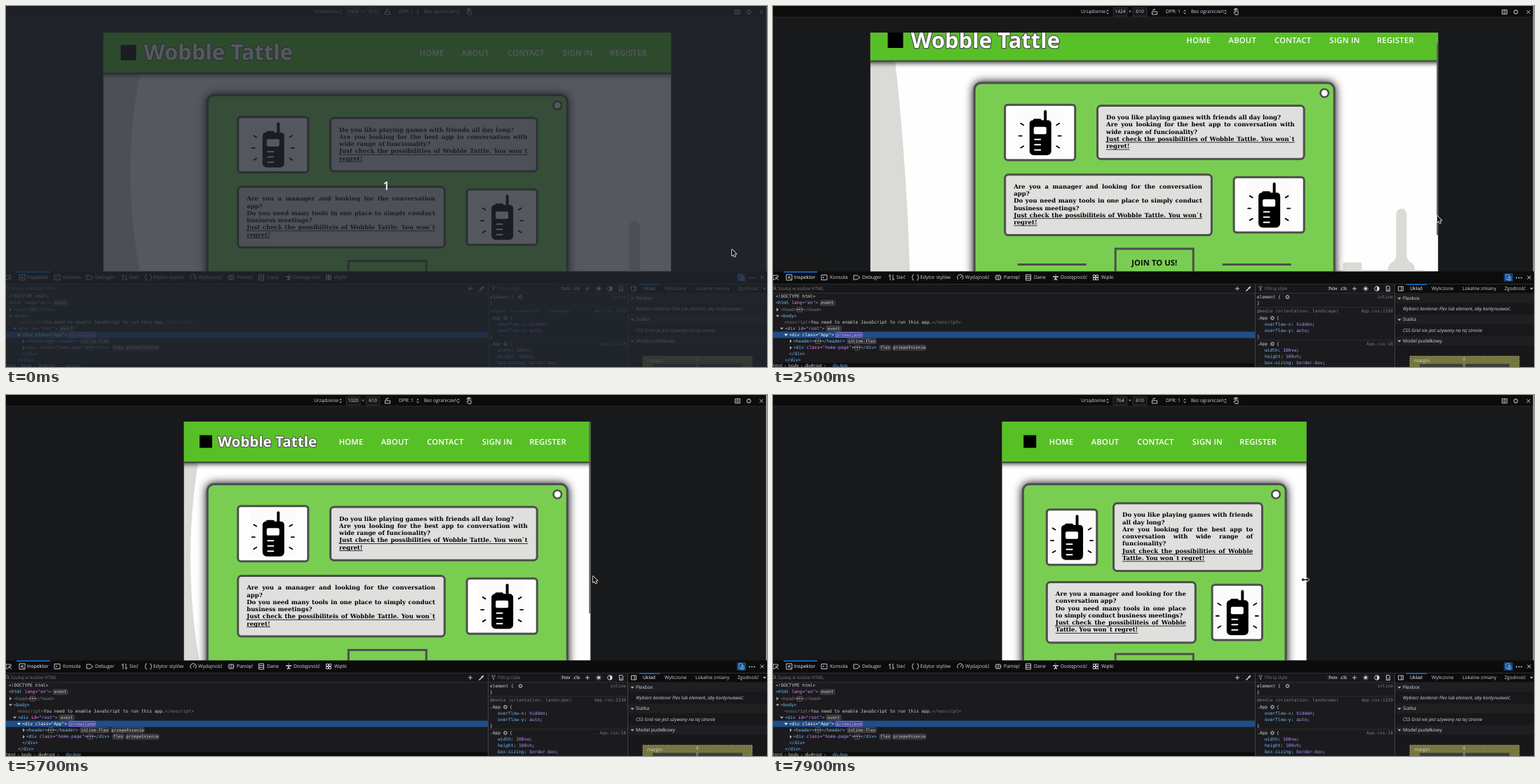
Animation of 1085x516 px, one loop 8000 ms. Source, as an HTML page with a canvas:

```html
<!DOCTYPE html>
<html lang="pl">
<head>
<meta charset="utf-8">
<style>
html, body { margin: 0; width: 100%; height: 100%; overflow: hidden; background: #18191a; }
canvas { display: block; }
</style>
</head>
<body>
<canvas id="stage" width="1085" height="516"></canvas>
<script>
const ctx = document.getElementById('stage').getContext('2d');
const LOOP = 8000, STEP = 100, SCALE = 0.5688, TOP = 38, BOTTOM = 379.5, MID = 543.75;
const UI = '"Open Sans", "Noto Sans", sans-serif';
const MONO = '6.25px "DejaVu Sans Mono", monospace';
const SERIF = 'bold 8.53px "DejaVu Serif", serif';
const DARK = '#4d4f4c', GREY = '#dadad6';
const BLUE = '#75bfff', PINK = '#ff7de9', VIOLET = '#b98eff', DIM = '#7c7c80', PALE = '#d7d7db';

// Keyframe rows are [time, value, value, ...].
const WIDTHS = [[3000, 1424], [3900, 1250], [4000, 1230], [4100, 1230], [4200, 1167], [4300, 1167],
  [5200, 1020], [6100, 1020], [7000, 903], [7200, 862], [7600, 794], [7700, 794], [7900, 764]];
const SCROLL = [[300, 0], [900, 82], [1000, 82], [1700, 17.5], [5250, 17.5], [5600, 0]];
const POINTER = [[0, 1035, 348], [350, 948, 300], [900, 948, 364], [1000, 948, 364], [1700, 947, 300],
  [2500, 947, 300], [2900, 948, 295], [5200, 832, 262], [5700, 837, 259], [6100, 834, 260]];
const GRIP_Y = [[3000, 296], [3900, 294], [5200, 262], [7200, 261], [7900, 264]];
const WAVE = [[0, 52, 39, 62], [1000, 22, 55, 46], [2500, 36, 50, 57], [3900, 60, 44, 72],
  [5700, 20, 10, 30], [6200, 14, 6, 24], [7000, -12, -18, -6]];

function at(t, keys) {
  if (t <= keys[0][0]) return keys[0].slice(1);
  const next = keys.findIndex(k => k[0] > t);
  if (next < 0) return keys[keys.length - 1].slice(1);
  const a = keys[next - 1], b = keys[next], p = (t - a[0]) / (b[0] - a[0]);
  return a.slice(1).map((v, i) => v + (b[i + 1] - v) * p);
}

function rect(x, y, w, h, color) {
  ctx.fillStyle = color;
  ctx.fillRect(x, y, w, h);
}

function round(x, y, w, h, r, fill, stroke, line = 1) {
  ctx.beginPath();
  ctx.roundRect(x, y, w, h, r);
  if (fill) { ctx.fillStyle = fill; ctx.fill(); }
  if (stroke) { ctx.strokeStyle = stroke; ctx.lineWidth = line; ctx.stroke(); }
}

function disc(x, y, r, fill, stroke, line) {
  round(x - r, y - r, 2 * r, 2 * r, r, fill, stroke, line);
}

function text(s, x, y, color, font, align = 'left') {
  ctx.font = font;
  ctx.textAlign = align;
  ctx.fillStyle = color;
  ctx.fillText(s, x, y);
}

function icon(d, x, y, color = PALE, line = 0.9) {
  ctx.save();
  ctx.translate(x, y);
  ctx.strokeStyle = color;
  ctx.lineWidth = line;
  ctx.stroke(new Path2D(d));
  ctx.restore();
}

function label(s, x, y, color = PALE, size = 6.9, style = '') {
  text(s, x, y, color, `${style} ${size}px ${UI}`);
}

function code(x, y, ...parts) {
  for (let i = 0; i < parts.length; i += 2) {
    text(parts[i], x, y, parts[i + 1], MONO);
    x += ctx.measureText(parts[i]).width;
  }
}

function badge(s, x, y, w, color = PALE, fill = '#2e2e33', edge = '#66666b') {
  round(x, y - 3.5, w, 7, 1.5, fill, edge, 0.6);
  text(s, x + w / 2, y, color, '5.9px "DejaVu Sans Mono", monospace', 'center');
}

function arrow(x, y, open, color = '#b1b1b3') {
  ctx.fillStyle = color;
  ctx.fill(new Path2D(open ? `M${x - 2} ${y - 1.3}h5l-2.5 3z` : `M${x - 1} ${y - 2.5}v5l3 -2.5z`));
}

function gear(x, y, r = 2.4) {
  disc(x, y, r, null, PALE, 0.8);
  ctx.setLineDash([1, 1]);
  disc(x, y, r + 0.7, null, PALE, 0.9);
  ctx.setLineDash([]);
}

const CROSS = 'M-2.5 -2.5l5 5M2.5 -2.5l-5 5', PLUS = 'M-3 0h6M0 -3v6';
const FRAME = 'M-3.5 -3h7v6h-7z', UPDOWN = 'M-1.3 -1l1.3 -1.6l1.3 1.6M-1.3 1l1.3 1.6l1.3 -1.6';

function topBar(width) {
  rect(0, 0, 1085, 16, '#0c0c0d');
  rect(0, 15.5, 1085, 1, '#2a2a2d');
  label('Urządzenie', 439, 8.5, PALE, 6.7);
  for (const x of [477, 587, 645]) icon(UPDOWN, x, 8.5);
  for (const [x, n] of [[485, width], [513, 610]]) {
    round(x, 2.5, 20, 12, 1, '#18181a', '#38383d', 0.8);
    text(n, x + 10, 8.5, PALE, `6.7px ${UI}`, 'center');
  }
  text('×', 509, 8.5, PALE, `6.7px ${UI}`, 'center');
  icon('M-3.5 0h7v4h-7zM-2 -1v-2h3l-1 -1', 544, 8);
  label('DPR: 1', 560, 8.5, PALE, 6.9);
  label('Bez ograniczeń', 596, 8.5, PALE, 6.7);
  icon('M-1 4l-2 -3l1 -1l1 1v-5h1.4v3l3 1l-.6 4zM-3 -2a3 3 0 0 1 6 0', 660, 8.5);
  icon(FRAME + 'M-1.5 0a1.5 1.5 0 1 0 3 0a1.5 1.5 0 1 0 -3 0', 1043, 8.5);
  gear(1059, 8.5);
  icon(CROSS, 1077, 8.5);
  rect(1083.6, 0, 1.4, BOTTOM, '#a9aca9');
}

function tabs() {
  rect(0, 379.5, 1085, 18, '#0c0c0d');
  rect(0, 397, 1085, 0.8, '#38383d');
  rect(15, 379.5, 48, 1.4, '#0a84ff');
  const names = [['Inspektor', 30], ['Konsola', 81], ['Debuger', 127], ['Sieć', 176], ['Edytor stylów', 210],
    ['Wydajność', 274], ['Pamięć', 329], ['Dane', 372], ['Dostępność', 410], ['Wątki', 468]];
  names.forEach(([s, x], i) => label(s, x, 388.5, i ? PALE : '#ffffff'));
  icon('M-4 -3h7v3M-4 -3v6h3M0 0l4 4M0 0v3M0 0h3', 4, 388);
  icon('M-4 -4h8v8h-8zM-1 -1l4 4M-1 2v-3h3', 23, 388);
  icon('M-4 -3.5h8v7h-8zM-2 -1l1.5 1l-1.5 1', 73, 388);
  icon('M-4 -3h5l4 3l-4 3h-5z', 119, 388);
  icon('M-2 4v-8l-2 2.5M2 -4v8l2 -2.5', 169, 388);
  icon('M-2 -4q-2 0 -2 2q0 2 -1 2q1 0 1 2q0 2 2 2M2 -4q2 0 2 2q0 2 1 2q-1 0 -1 2q0 2 -2 2', 203, 388);
  icon('M-3 3a4.2 4.2 0 1 1 6 0M0 1l2 -3', 267, 388);
  icon('M-3 -3h6v6h-6zM-4.5 -1h1M-4.5 1h1M3 -1h1.5M3 1h1.5M0 -3v6', 321, 388);
  icon('M-3.5 -4h7v8h-7zM-3.5 -1.3h7M-3.5 1.3h7', 364, 388);
  icon('M-4 -1h8M0 -1v2l-2 3M0 1l2 3M-.5 -3.5h1', 403, 388, PALE, 1.3);
  icon('M-3.5 -3.5h3v3h-3zM.5 -3.5h3v3h-3zM-3.5 .5h3v3h-3zM.5 .5h3v3h-3z', 460, 388);
  round(1042, 382, 13, 12, 1, '#16406f');
  icon('M-3 -4h5v7h-5zM0 -1h4v5h-4z', 1048, 388, BLUE);
  for (const x of [1060, 1063.5, 1067]) disc(x, 388.5, 0.9, PALE);
  icon(CROSS, 1078, 388);
}

function markup(overflowing) {
  rect(0, 398, 688, 118, '#1b1b1e');
  rect(0, 398, 688, 12, '#18181a');
  rect(0, 410, 688, 0.7, '#38383d');
  label('Szukaj w kodzie HTML', 7, 404, DIM, 6.4);
  icon('M1 1l2 2M-2.5 0a2 2 0 1 0 4 0a2 2 0 1 0 -4 0', 2, 403, DIM);
  icon(PLUS, 662, 404);
  icon('M-3.5 3.5l4 -4M0 -2l2 2M1 -1l2 -2', 678, 404, PALE, 1.5);
  rect(0, 465.5, 688, 9, '#204e8a');
  code(4, 415.5, '<!DOCTYPE html>', PALE);
  code(4, 424.5, '<html ', BLUE, 'lang', PINK, '="en"', VIOLET, '>', BLUE);
  badge('event', 67, 424.5, 21);
  arrow(6, 434, false);
  code(11, 434, '<head>', DIM);
  badge('•••', 34, 434, 8);
  code(43, 434, '</head>', DIM);
  arrow(6, 443, true);
  code(11, 443, '<body>', BLUE);
  code(16, 452, '<noscript>', DIM, 'You need to enable JavaScript to run this app.', PALE, '</noscript>', DIM);
  arrow(12, 461, true);
  code(17, 461, '<div ', BLUE, 'id', PINK, '="root"', VIOLET, '>', BLUE);
  badge('event', 76, 461, 21);
  arrow(18, 470, true, '#ffffff');
  code(23, 470, '<div class="App">', '#ffffff');
  badge('przewijane', 89.5, 470, 38, '#c3a6ff', '#3f4f9c', VIOLET);
  arrow(25, 479, false);
  code(29, 479, '<header>', BLUE);
  badge('•••', 60, 479, 8);
  code(69, 479, '</header>', BLUE);
  badge('inline-flex', 106, 479, 41);
  if (overflowing) badge('przepełnienie', 150, 479, 47);
  arrow(25, 488.5, false);
  code(29, 488.5, '<div ', BLUE, 'class', PINK, '="home-page"', VIOLET, '>', BLUE);
  badge('•••', 116, 488.5, 8);
  code(125, 488.5, '</div>', BLUE);
  badge('flex', 152, 488.5, 16);
  badge('przepełnienie', 171, 488.5, 47);
  code(23, 497.5, '</div>', BLUE);
  code(17, 506.5, '</div>', BLUE);
  rect(0, 510.5, 688, 6, '#0c0c0d');
  label('html  ›  body  ›  div#root  ›', 0, 514.5, PALE, 6.3);
  label('div.App', 85, 514.5, BLUE, 6.3);
}

function declaration(y, name, value) {
  code(701, y, name, BLUE, ': ', PALE, value, VIOLET, ';', PALE);
}

function rules() {
  rect(687, 398, 200, 118, '#1b1b1e');
  rect(687, 398, 200, 12, '#18181a');
  rect(687, 410, 200, 0.7, '#38383d');
  icon('M-2.5 -3h5l-2 3v3l-1 -1v-2z', 695, 404, DIM);
  label('Filtruj style', 701, 404, DIM, 6.4);
  label(':hov', 791, 404, PALE, 6.7, '600');
  label('.cls', 808, 404, PALE, 6.7, '600');
  icon(PLUS, 829, 404);
  disc(845, 404, 1.8, PALE);
  icon('M-4 0h8M0 -4v8M-2.8 -2.8l5.6 5.6M2.8 -2.8l-5.6 5.6', 845, 404, PALE, 0.7);
  disc(861, 404, 3.3, null, PALE, 0.9);
  ctx.fillStyle = PALE;
  ctx.fill(new Path2D('M861 400.7a3.3 3.3 0 0 1 0 6.6z'));
  icon('M-2.5 -3.5h4l1 1v6h-5zM0 0v3', 877, 404);
  code(690, 416, 'element {', PALE);
  gear(733.5, 416, 1.9);
  text('inline', 884, 416, DIM, MONO, 'right');
  code(690, 425, '}', PALE);
  code(690, 436, '@media (orientation: landscape)', DIM);
  text('App.css:1330', 884, 436, DIM, MONO, 'right');
  for (const y of [446, 483]) {
    code(690, y, '.App', PALE);
    gear(712, y, 1.9);
    code(718, y, '{', PALE);
  }
  declaration(455, 'overflow-x', 'hidden');
  declaration(464, 'overflow-y', 'auto');
  code(690, 473, '}', PALE);
  text('App.css:18', 884, 483, DIM, MONO, 'right');
  declaration(492, 'width', '100vw');
  declaration(501, 'height', '100vh');
  declaration(510, 'box-sizing', 'border-box');
  rect(687, 430.5, 200, 0.7, '#38383d');
  rect(687, 477.5, 200, 0.7, '#38383d');
  rect(687, 398, 0.8, 118, '#4a4a4f');
}

function layoutPane() {
  rect(886, 398, 199, 118, '#18181a');
  rect(886, 398, 199, 12, '#0c0c0d');
  rect(903, 397.5, 29, 1.2, '#0a84ff');
  icon('M-3.5 -3h7v6h-7zM1 -3v6', 895, 404);
  label('Układ', 908, 404, '#ffffff', 6.7);
  label('Wyliczone', 939, 404, PALE, 6.7);
  label('Lokalne zmiany', 983, 404, PALE, 6.7);
  label('Zgodność', 1043, 404, PALE, 6.7);
  arrow(1081, 404, true);
  for (const [s, y] of [['Flexbox', 418], ['Siatka', 448.5], ['Model pudełkowy', 479]]) {
    rect(886, y - 7.5, 199, 14, '#1f1f22');
    arrow(892.5, y, true);
    label(s, 898, y, PALE, 6.8);
  }
  label('Wybierz kontener Flex lub element, aby kontynuować.', 898, 433.5, PALE, 6.6, 'italic');
  label('CSS Grid nie jest używany na tej stronie', 898, 464, PALE, 6.6, 'italic');
  rect(908, 500.5, 156, 16, '#76763f');
  rect(922, 511.5, 128, 5, '#3d3d3d');
  ctx.setLineDash([2, 1.5]);
  round(908, 500.5, 156, 30, 0, null, '#b5b58a', 0.7);
  ctx.setLineDash([]);
  label('margin', 914, 507, PALE, 6.7);
  for (const y of [505, 514.5]) text('0', 985.5, y, PALE, `6.7px ${UI}`, 'center');
  rect(886, 398, 0.8, 118, '#4a4a4f');
}

function wave(t, left, scroll) {
  const [a, b, c] = at(t, WAVE);
  ctx.beginPath();
  ctx.moveTo(left, TOP);
  for (let y = TOP; y <= 390; y += 8) {
    const u = (y + scroll - 260) / 160;
    ctx.lineTo(left + Math.max(0, b + (c - a) / 2 * u + ((a + c) / 2 - b) * u * u), y);
  }
  ctx.lineTo(left, 390);
  ctx.fillStyle = GREY;
  ctx.fill();
}

// Pale device behind the panel, placed from the right edge of the page.
function backdrop(right, scroll) {
  ctx.save();
  ctx.translate(right - 949, 82 - scroll);
  round(889, 225, 15, 100, 7.5, GREY);
  ctx.fillStyle = GREY;
  ctx.fill(new Path2D('M890 290Q888 301 881 303Q877 307 877 315H916Q916 307 912 303Q905 301 903 290Z'));
  round(813, 302, 27, 18, 3, GREY);
  round(792, 313, 143, 100, 8, GREY);
  round(811, 332, 104, 39, 3, '#fefefe');
  disc(902, 385, 9, '#fefefe');
  ctx.restore();
}

function photo(x, y, w) {
  round(x + 1.5, y + 1.5, w - 3, 79, 4, '#fefefe', DARK, 3);
  ctx.save();
  ctx.translate(x + w / 2, y + 41);
  rect(-33, -34, 66, 68, '#fbfbfa');
  round(5.5, -32, 4, 26, 2, '#000');
  round(-10, -19.5, 12, 5, 2, '#000');
  round(-15, -17.5, 31, 50, [5, 5, 6, 6], '#000');
  round(-9, -8, 18, 10.5, 2, '#fefefe');
  for (const dy of [9, 16.5, 24]) round(-8.5, dy, 10, 2, 1, '#fefefe');
  ctx.lineCap = 'round';
  icon('M-30 5h4M-27.5 -13l4 2.5M-27.5 22l4 -2.5M30 5h-4M27.5 -13l-4 2.5M27.5 22l-4 -2.5', 0, 0, '#000', 1.8);
  ctx.restore();
}

const PITCH = [
  ['Do you like playing games with friends all day long?',
    'Are you looking for the best app to conversation with wide range of funcionality?',
    'Just check the possibilities of Wobble Tattle. You won`t regret!'],
  ['Are you a manager and looking for the conversation app?',
    'Do you need many tools in one place to simply conduct business meetings?',
    'Just check the possibiliteis of Wobble Tattle. You won`t regret!']];

function wrap(paragraphs, width) {
  ctx.font = SERIF;
  const lines = [];
  paragraphs.forEach((paragraph, i) => {
    let words = [];
    for (const word of paragraph.split(' ')) {
      if (words.length && ctx.measureText([...words, word].join(' ')).width > width) {
        lines.push({ words, full: true, under: i === 2 });
        words = [];
      }
      words.push(word);
    }
    lines.push({ words, full: false, under: i === 2 });
  });
  return lines;
}

const PADDING = 28.9;
const cardHeight = lines => 28 + 10.25 * lines.length;

function card(x, y, w, lines) {
  round(x + 1.5, y + 1.5, w - 3, cardHeight(lines) - 3, 5, '#dfdfde', DARK, 3);
  lines.forEach(({ words, full, under }, i) => {
    const ly = y + 19 + i * 10.25, room = w - PADDING;
    const natural = ctx.measureText(words.join(' ')).width;
    const gap = ctx.measureText(' ').width + (full ? (room - natural) / (words.length - 1) : 0);
    let wx = x + 14;
    for (const word of words) {
      text(word, wx, ly, '#000', SERIF);
      wx += ctx.measureText(word).width + gap;
    }
    if (under) rect(x + 14, ly + 3.7, full ? room : natural, 0.8, '#000');
  });
}

function panel(mid, pageWidth, scroll) {
  const w = Math.min(516, pageWidth - 57), x = mid - w / 2, y = 126 - scroll;
  ctx.save();
  ctx.shadowColor = '#000';
  ctx.shadowBlur = 13;
  round(x, y, w, 312, 11, DARK);
  ctx.restore();
  round(x + 3, y + 3, w - 6, 306, 8, '#79ce51');
  disc(x + w - 15.5, y + 16, 5.8, '#fefefe', DARK, 2.6);
  disc(x + 15.5, y + 296.5, 5.8, '#fefefe', DARK, 2.6);

  const inner = 0.862 * w - 15.3, left = mid - inner / 2 + 0.2;
  const photoW = inner * 0.24, cardW = inner * 0.693;
  let rowY = y + 16.7 + 0.028 * w;
  PITCH.forEach((paragraphs, i) => {
    const lines = wrap(paragraphs, cardW - PADDING), h = cardHeight(lines), rowH = Math.max(82, h);
    photo(i ? left + inner - photoW : left, rowY + (rowH - 82) / 2, photoW);
    ctx.font = SERIF;
    card(i ? left : left + inner - cardW, rowY + (rowH - h) / 2, cardW, lines);
    rowY += rowH + (i ? 0.022 * w + 5 : 0.036 * w - 0.6);
  });
  round(mid - 55.5, rowY + 1.5, 111, 42, 0, null, DARK, 3);
  text('JOIN TO US!', mid, rowY + 23, '#0b0b0b', `bold 11.3px ${UI}`, 'center');
  rect(mid - 195, rowY + 22.5, 98, 3, DARK);
  rect(mid + 97, rowY + 22.5, 98, 3, DARK);
}

function header(left, right, width, scroll) {
  const y = TOP - scroll, big = width >= 1100, short = width < 900, bare = width < 768;
  ctx.save();
  ctx.shadowColor = 'rgba(0,0,0,.8)';
  ctx.shadowBlur = 7;
  ctx.shadowOffsetY = 2;
  rect(left - 10, y, right - left + 20, 59.2, '#44503f');
  ctx.restore();
  rect(left, y, right - left, 57, '#58c027');

  const logoX = left + (bare ? 31 : big ? 25 : 22.5), size = big ? 22 : 18;
  rect(logoX, y + 28.5 - size / 2, size, size, '#000');
  if (!bare) {
    ctx.font = `700 ${big ? 31 : short ? 34 : 20.6}px ${UI}`;
    ctx.textAlign = 'left';
    ctx.lineJoin = 'round';
    ctx.lineWidth = big || short ? 2.4 : 2;
    ctx.strokeStyle = '#4a4f48';
    ctx.fillStyle = '#fff';
    const title = short ? 'WT' : 'Wobble Tattle', tx = logoX + (big ? 33 : short ? 28 : 26);
    ctx.strokeText(title, tx, y + 31);
    ctx.fillText(title, tx, y + 31);
  }
  const navX = right - (bare ? 367 : 359);
  ctx.letterSpacing = '0.25px';
  for (const [s, dx] of [['HOME', 0], ['ABOUT', 60], ['CONTACT', 125.5], ['SIGN IN', 204], ['REGISTER', 271.5]])
    text(s, navX + dx, y + 30, '#fff', `600 11.2px ${UI}`);
  ctx.letterSpacing = '0px';
}

function page(t, width) {
  const frameW = width * SCALE, left = MID - frameW / 2 - 0.2;
  const gripping = t > 3000 && t <= 5200;
  const pageW = frameW - (gripping ? 3 : 0), right = left + pageW;
  const [scroll] = at(t, SCROLL);
  ctx.save();
  ctx.beginPath();
  ctx.rect(left, TOP, frameW, BOTTOM - TOP);
  ctx.clip();
  rect(left, TOP, frameW, 350, '#101112');
  rect(left + frameW - 0.7, TOP, 0.7, 350, '#3a3a3c');
  ctx.beginPath();
  ctx.rect(left, TOP, pageW, 350);
  ctx.clip();
  rect(left, TOP, pageW, 350, '#fefefe');
  wave(t, left, scroll);
  if (width > 1100) backdrop(right, scroll);
  panel(left + pageW / 2 + 0.2, pageW, scroll);
  header(left, right, width, scroll);
  const thumbY = TOP + scroll * 0.878;
  if (gripping) rect(right - 3.5, thumbY, 3, 274, 'rgba(150,150,150,.55)');
  else if ((t >= 400 && t <= 3000) || (t > 5200 && t <= 6100)) rect(right - 2.3, thumbY, 2, 274, '#5c5f5c');
  ctx.restore();
  return left + frameW;
}

function pointer(t, right) {
  const resizing = (t > 3000 && t <= 5200) || t > 6100;
  const [x, y] = resizing ? [right - 2, at(t, GRIP_Y)[0]] : at(t, POINTER);
  ctx.save();
  ctx.translate(x, y);
  ctx.lineJoin = 'round';
  const shape = new Path2D(resizing
    ? 'M-5.5 0l3 -2.5v1.7h5v-1.7l3 2.5l-3 2.5v-1.7h-5v1.7z'
    : 'M0 0v9l2.1 -1.9l1.6 3.3l1.5 -.7l-1.6 -3.2h2.9z');
  ctx.lineWidth = 1.6;
  ctx.strokeStyle = '#eee';
  ctx.stroke(shape);
  ctx.fillStyle = '#111';
  ctx.fill(shape);
  ctx.restore();
}

function countdown(t) {
  const strength = Math.max(0, 1 - t / 900);
  if (!strength) return;
  ctx.save();
  ctx.globalAlpha = strength;
  rect(0, 0, 1085, 516, 'rgba(34,39,48,.77)');
  text('1', 542, 259, '#e6f6fb', `600 17px ${UI}`, 'center');
  ctx.restore();
}

function draw(t) {
  const width = Math.round(at(t, WIDTHS)[0] / 2) * 2;
  ctx.textBaseline = 'middle';
  ctx.textRendering = 'geometricPrecision';
  rect(0, 0, 1085, 516, '#18191a');
  const right = page(t, width);
  topBar(width);
  tabs();
  markup(width < 1400 && width > 940);
  rules();
  layoutPane();
  countdown(t);
  pointer(t, right);
}

const start = performance.now();
let shown = -1;
function tick(now) {
  const t = Math.floor(Math.max(0, now - start) % LOOP / STEP) * STEP;
  if (t !== shown) draw(shown = t);
  requestAnimationFrame(tick);
}
draw(0);
requestAnimationFrame(tick);
</script>
</body>
</html>
```
